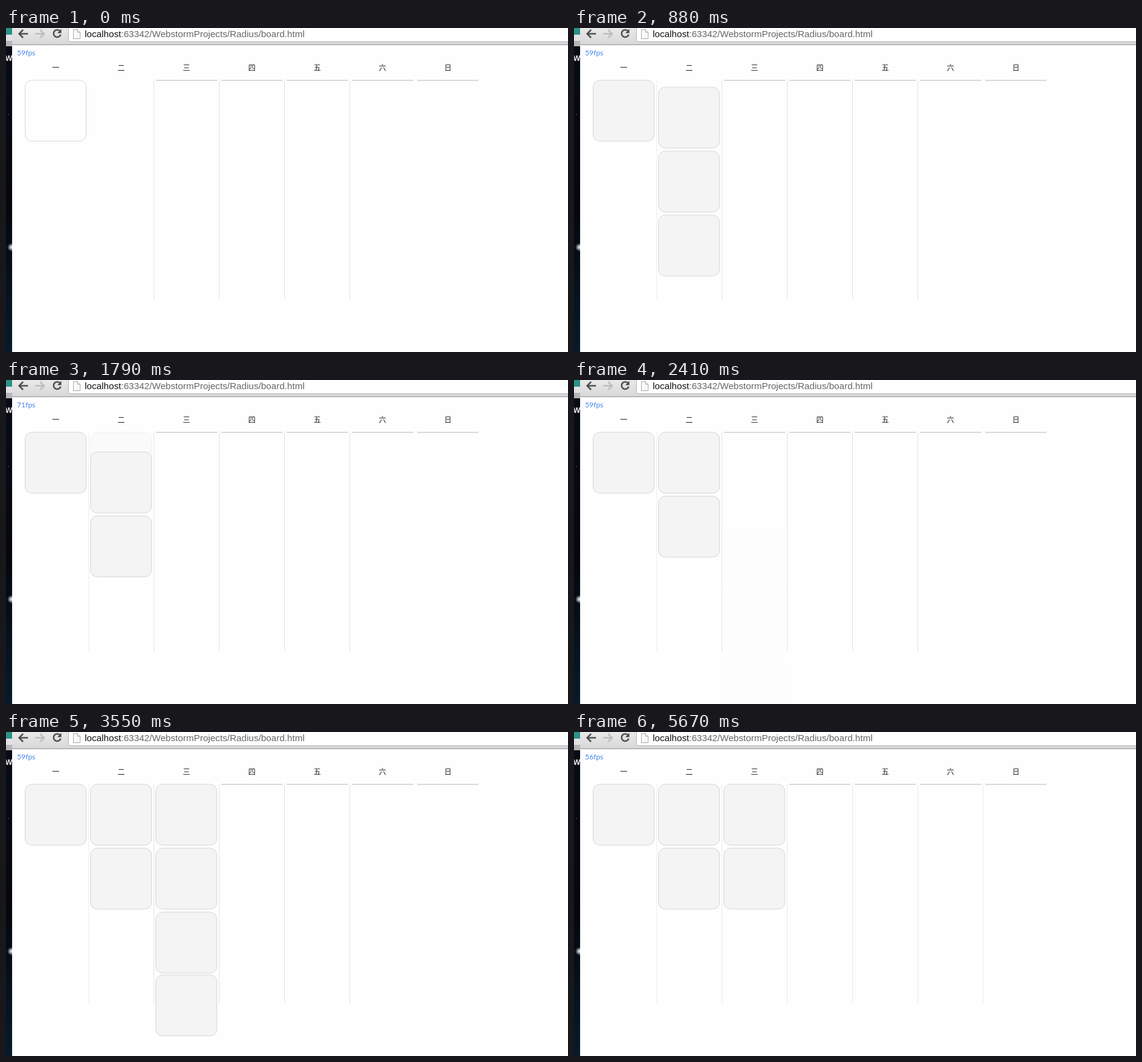
An HTML page that plays this animation: 921 px wide and 532 px high, repeating every 5.74 s.

```html
<!DOCTYPE html>
<html>
<head>
<meta charset="utf-8">
<title>Board</title>
<style>
  html, body { margin: 0; width: 100%; height: 100%; overflow: hidden; background: #fefefe; }
  svg { display: block; }
  .url { font: 15.14px "Liberation Sans", Arial, sans-serif; }
  .day { font: 300 12px "Noto Sans CJK SC", "Noto Sans CJK", serif; fill: #222; text-anchor: middle; }
  .fps { font: 12px Lato, sans-serif; fill: #4a83ee; }
  .card { fill: #f4f4f4; stroke: #d6d6d6; }
</style>
</head>
<body>
<svg id="stage" width="921" height="532" viewBox="0 0 921 532">
  <defs>
    <linearGradient id="sky" x2="0" y2="1">
      <stop offset="0" stop-color="#080c14"/>
      <stop offset=".55" stop-color="#04070c"/>
      <stop offset="1" stop-color="#071a2c"/>
    </linearGradient>
    <linearGradient id="chrome" x2="0" y2="1">
      <stop offset="0" stop-color="#e9e9e9"/>
      <stop offset="1" stop-color="#d8d8d8"/>
    </linearGradient>
    <radialGradient id="glow">
      <stop offset="0" stop-color="#fff"/>
      <stop offset="1" stop-color="#fff" stop-opacity="0"/>
    </radialGradient>
  </defs>
  <rect width="921" height="532" fill="#fefefe"/>

  <g id="desktop">
    <rect width="10" height="532" fill="url(#sky)"/>
    <rect width="10" height="12" fill="#2b9287"/>
    <rect y="11" width="10" height="10" fill="#e2e2e2"/>
    <rect y="21" width="10" height="9" fill="#b5b5b5"/>
    <text x="-1" y="54" font-family="Liberation Sans, sans-serif" font-size="12" font-weight="700" fill="#eee">W</text>
    <circle cx="9" cy="360" r="7" fill="url(#glow)"/>
    <circle cx="4" cy="142" r=".8" fill="#667"/>
  </g>

  <g id="toolbar">
    <rect x="10" width="911" height="27" fill="url(#chrome)"/>
    <path d="M10 27.5H921" stroke="#8e8e8e"/>
    <path d="M102.5 -5V19q0 3.500 3.500 3.500H925V-5z" fill="#fff" stroke="#b4b4b4"/>
    <g fill="none" stroke-width="2.6">
      <path d="M36 9.500H22M28 3L21.500 9.500L28 16" stroke="#505050"/>
      <path d="M48 9.500H62M56 3L62.500 9.500L56 16" stroke="#bdbdbd"/>
      <path d="M88.500 5A6 6 0 1 0 89.600 11" stroke="#505050"/>
    </g>
    <path d="M90.800 1.500V8.500H84z" fill="#505050"/>
    <path d="M110.500 2.500H117L121.500 7V17.500H110.500zM117 2.500V7H121.500" fill="#fafafa" stroke="#a6a6a6"/>
    <text class="url" x="129" y="15" fill="#666"><tspan fill="#111">localhost</tspan>:63342/WebstormProjects/Radius/board.html</text>
  </g>

  <text id="fps" class="fps" x="18" y="45"></text>
  <g id="lines"></g>
  <g id="cards"></g>
</svg>
<script>
  const LOOP = 5740, TOP = 85.8, LEFT = 31.4, COL = 107.1, ROW = 105, SIZE = 100;
  const ENTER = 1060, LEAVE = 1130, RISE = 165;
  const fpsValues = [59, 60, 60, 59, 58, 60, 71, 60, 59, 60, 59, 61, 59, 60, 58, 59, 60, 60, 59, 56];
  // Each column: entry time, removal time, card count, first removed row, removed rows
  const columns = [
    { enter: -2000, leave: 9000, count: 1, from: 1, cut: 0 },
    { enter: 0, leave: 1085, count: 3, from: 0, cut: 1 },
    { enter: 2280, leave: 3483, count: 4, from: 1, cut: 2 }
  ];

  const byId = id => document.getElementById(id);
  const clamp = v => Math.max(0, Math.min(1, v));
  const ease = u => (1 - Math.cos(Math.PI * clamp(u))) / 2;
  const colX = i => LEFT + i * COL;

  function add(parent, tag, attrs, text) {
    const el = document.createElementNS("http://www.w3.org/2000/svg", tag);
    for (const key in attrs) el.setAttribute(key, attrs[key]);
    if (text) el.textContent = text;
    return parent.appendChild(el);
  }

  [..."一二三四五六日"].forEach((day, i) =>
    add(byId("stage"), "text", { class: "day", x: colX(i) + 50.2, y: 70 }, day));

  const dividers = [1, 2, 3, 4, 5, 6].map(i =>
    add(byId("lines"), "path", { d: `M${Math.floor(colX(i) - 3)}.5 86V446` }));

  const bars = [2, 3, 4, 5, 6].map(i =>
    add(byId("lines"), "rect", { x: colX(i), y: 85, width: 100.5, height: 2, fill: "#d9d9d9" }));

  columns.forEach((col, i) => {
    col.cards = Array.from({ length: col.count }, () =>
      add(byId("cards"), "rect", { class: "card", x: colX(i), width: SIZE, height: SIZE, rx: 11 }));
  });

  function drawColumn(col, t) {
    const shown = ease((t - col.enter) / ENTER);
    const gone = ease((t - col.leave) / LEAVE);
    col.cards.forEach((card, row) => {
      const removed = row >= col.from && row < col.from + col.cut;
      const shift = row >= col.from + col.cut ? gone * col.cut * ROW : 0;
      card.setAttribute("y", TOP + row * ROW + (1 - shown) * RISE - shift);
      card.setAttribute("opacity", removed ? shown * (1 - gone) : shown);
    });
  }

  function draw(t) {
    columns.forEach(col => drawColumn(col, t));
    columns[0].cards[0].style.fill = t < 60 ? "#fefefe" : "";
    bars[0].setAttribute("opacity", clamp(1 - 2.5 * ease((t - columns[2].enter) / ENTER)));
    const late = t >= 5100;
    dividers.forEach((line, i) => {
      const hidden = i === 0 ? t < 60 : i === 5 && !late;
      const faint = i === 0 || i === 5;
      line.setAttribute("stroke", hidden ? "none" : faint ? "#f0f0f0" : late ? "#eaeaea" : "#e4e4e4");
    });
    byId("fps").textContent = fpsValues[Math.floor(t / LOOP * fpsValues.length)] + "fps";
  }

  const start = performance.now();
  function tick() {
    draw((performance.now() - start) % LOOP);
    requestAnimationFrame(tick);
  }
  tick();
</script>
</body>
</html>
```
